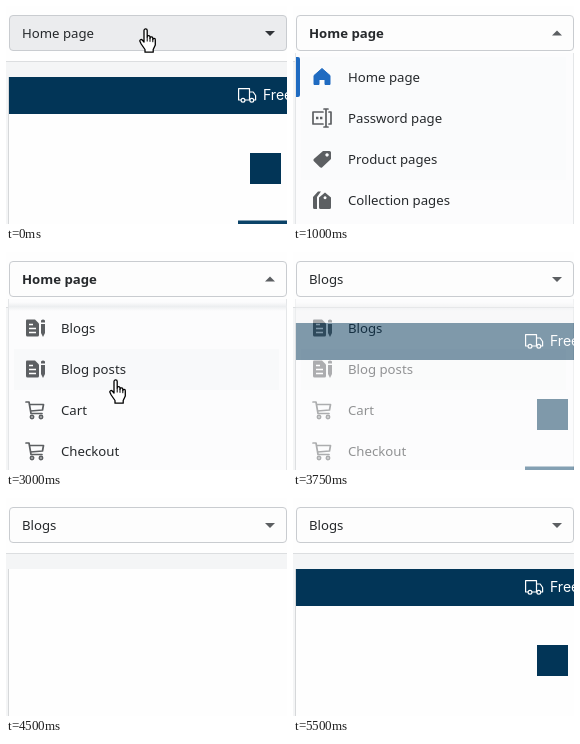
Recreate the animation shown at these times as an HTML page. Size 281 by 218 pixels, loop 5750 ms.

```html
<!DOCTYPE html>
<html lang="en">
<head>
<meta charset="utf-8">
<title>Page picker</title>
<style>
  html, body { margin: 0; width: 100%; height: 100%; overflow: hidden; background: #fefefe; }
  svg { display: block; width: 100vw; height: 100vh; }
  text { font: 13.2px "Noto Sans", "Open Sans", sans-serif; fill: #26292c; }
  #label { font-weight: 500; }
  #label.open { font-weight: 600; }
  .line { fill: none; stroke: #5c5f62; stroke-width: 1.7; stroke-linejoin: round; stroke-linecap: round; }
  .solid { fill: #5c5f62; }
</style>
</head>
<body>
<svg viewBox="0 0 281 218" preserveAspectRatio="none">
  <defs>
    <clipPath id="menuClip"><rect x="0" y="47" width="281" height="171"/></clipPath>
    <linearGradient id="fade" x2="0" y2="1">
      <stop offset="0" stop-color="#e9ebed" stop-opacity="0"/>
      <stop offset=".5" stop-color="#e9ebed" stop-opacity=".8"/>
      <stop offset="1" stop-color="#e9ebed" stop-opacity="0"/>
    </linearGradient>

    <g id="home">
      <path d="M0-8.5 8-1.5V7.5H3V2.5H-3V7.5H-8V-1.5Z" fill="#1f6bc1" stroke="#1f6bc1" stroke-linejoin="round"/>
    </g>
    <g id="password">
      <path class="line" d="M1-6H-9V6H1M7-6H9V6H7M2-9H6M4-9V9M2 9H6"/>
      <path class="solid" d="M-6-1.2h2.4v2.4h-2.4zM-2-1.2h2.4v2.4h-2.4z"/>
    </g>
    <g id="tag">
      <path class="solid" fill-rule="evenodd" d="M1-8H7.5Q9-8 9-6.5V0L0 8.5Q-1 9-2 8.2L-8.3 2Q-9 1-8.2 0ZM5-5.8a1.7 1.7 0 1 0 .1 0Z"/>
    </g>
    <g id="tags">
      <path class="solid" fill-rule="evenodd" d="M3-7.5 9-2.5V7.5Q9 9 7.5 9H-1.5Q-3 9-3 7.5V-2.5ZM3-3.8a1.5 1.5 0 1 0 .1 0Z"/>
      <path class="solid" d="M-1-8.5-5-3V9H-7.5Q-9 9-9 7.5V-3L-4-8.5Z"/>
    </g>
    <g id="blog">
      <path class="solid" d="M-8-8.5H0L4-4.5V7Q4 8.5 2.5 8.5H-7.5Q-9 8.5-9 7V-7.5Q-9-8.5-8-8.5Z"/>
      <path d="M-6-3.5H-2M-6 .5H1M-6 4.5H1" stroke="#fff" stroke-width="1.6"/>
      <path class="solid" d="M6-7.5Q8-9.5 10-7.5V-5.5H6ZM6-4H10V5L8 9 6 5Z"/>
    </g>
    <g id="cart">
      <path class="line" d="M-9-8H-6L-4 3.5H7M-5.5-5.5H8.5L7.5 0-4.5 1"/>
      <circle class="line" cx="-3" cy="7" r="1.6"/>
      <circle class="line" cx="6" cy="7" r="1.6"/>
    </g>
  </defs>

  <rect width="281" height="218" fill="#fefefe"/>
  <rect y="56" width="281" height="162" fill="#f4f5f6"/>
  <path d="M0 55.5H281" stroke="#dcdee0"/>
  <path d="M2.5 71V218" stroke="#d6d8da"/>

  <rect x="3" y="71" width="278" height="147" fill="#fefefe"/>
  <g id="page">
    <rect x="3" y="71" width="278" height="37" fill="#023557"/>
    <g fill="none" stroke="#fff" stroke-width="1.2" stroke-linejoin="round">
      <path d="M235 94H232.6V82.6H243.5V94H239M243.5 86H247.2L249.6 89.5V94H248M244 94H243"/>
      <circle cx="237" cy="94.3" r="1.9"/>
      <circle cx="245.8" cy="94.3" r="1.9"/>
    </g>
    <text x="257" y="94" style="font:14px Inter,sans-serif;fill:#fff">Free</text>
    <rect x="244" y="147" width="31" height="31" fill="#023557"/>
    <rect id="hero" x="232" y="214.5" width="49" height="4" fill="#0b4368"/>
  </g>

  <rect id="button" x="3.5" y="9.5" width="277" height="35" rx="3.5" stroke="#c9ccd0"/>
  <text id="label" x="16" y="32"></text>
  <path id="caret"/>

  <g id="menu" clip-path="url(#menuClip)">
    <rect x="2" y="47" width="279" height="171" fill="#e4e6e8"/>
    <rect x="3" y="47" width="277" height="171" fill="#fcfcfd"/>
    <g id="list"></g>
    <rect id="edge" x="3" y="50" width="278" height="9" fill="url(#fade)"/>
  </g>

  <g id="hand" stroke="#000" stroke-width="1.3" stroke-linejoin="round">
    <path fill="#fff" d="M5 2.5a1.6 1.6 0 0 1 3.2 0V9a1.4 1.4 0 0 1 2.8 .2V10.2a1.4 1.4 0 0 1 2.8 .2V11.6a1.2 1.2 0 0 1 2.5 .2V17L14.2 21.5V24.2H6V21.5L2.2 16 .8 13A1.4 1.4 0 0 1 3 11.8L5 14Z"/>
    <path fill="none" stroke-width="1" d="M8.2 9V13.5M11 10V13.8M13.8 11.5V14.2"/>
  </g>
  <path id="arrow" fill="#fff" stroke="#000" stroke-linejoin="round" d="M.6 .6V16L4.2 12.6 6.8 18.4 9.2 17.4 6.7 11.7H11.4Z"/>
</svg>

<script>
const LOOP = 5750;
const ROW = 41;
const ROWS = [
  ["Home page", "home"], ["Password page", "password"], ["Product pages", "tag"],
  ["Collection pages", "tags"], ["Collections list", "tags"], ["Blogs", "blog"],
  ["Blog posts", "blog"], ["Cart", "cart"], ["Checkout", "cart"]
];
const $ = id => document.getElementById(id);
const set = (el, attrs) => { for (const k in attrs) el.setAttribute(k, attrs[k]); };

$("list").innerHTML = ROWS.map(([name, icon], i) => {
  const y = 71 + i * ROW;
  return `<rect class="row" x="8" y="${y - 20}" width="265" height="${ROW}" fill="none"/>
    <use href="#${icon}" x="29" y="${y}"/><text x="55" y="${y + 5}">${name}</text>`;
}).join("") + '<path d="M3 51h2q2 0 2 2v36q0 2-2 2h-2z" fill="#1f6bc1"/>';
const rowRects = [...document.querySelectorAll(".row")];

// Each step changes only the listed parts of the previous state.
const STEPS = [
  [0, { label: "Home page", menu: 0, scroll: 0, hover: -1, fill: "#ebecee",
        page: true, hero: true, hand: [133, 22], arrow: null }],
  [250, { menu: .5, fill: "#f4f5f6" }],
  [500, { menu: 1, fill: "#fdfdfd" }],
  [750, { hover: 3, hand: [127, 184] }],
  [1000, { hover: -1, hand: null }],
  [2000, { hand: [127, 146] }],
  [2250, { scroll: 110, hand: [121, 146] }],
  [2500, { scroll: 200, hover: 6 }],
  [3000, { hand: [103, 127] }],
  [3250, { hand: [84, 75] }],
  [3500, { hand: null }],
  [3750, { label: "Blogs", menu: .5 }],
  [4000, { menu: 0, arrow: [130, 125] }],
  [4250, { arrow: null }],
  [4500, { page: false }],
  [4750, { page: true, hero: false }]
];

const stateAt = t => Object.assign({}, ...STEPS.filter(s => s[0] <= t).map(s => s[1]));
const show = (id, on) => set($(id), { visibility: on ? "inherit" : "hidden" });

function place(id, pos) {
  show(id, pos);
  if (pos) set($(id), { transform: `translate(${pos})` });
}

function draw(t) {
  const s = stateAt(t);
  const open = s.menu > 0 && s.label === "Home page";
  set($("button"), { fill: s.fill });
  set($("label"), { class: open ? "open" : "" });
  $("label").textContent = s.label;
  set($("caret"), {
    d: open ? "M259 29.5 264 24.5 269 29.5Z" : "M259 25 269 25 264 30Z",
    fill: t < 250 ? "#303337" : "#5c5f62"
  });
  set($("menu"), { opacity: s.menu });
  set($("list"), { transform: `translate(0 ${-s.scroll})` });
  rowRects.forEach((r, i) => set(r, {
    fill: i === s.hover ? (i === 3 ? "#f3f4f5" : "#f8f9fa") : i < 3 ? "#fafbfc" : "none"
  }));
  show("edge", s.scroll);
  show("page", s.page);
  show("hero", s.hero);
  place("hand", s.hand);
  place("arrow", s.arrow);
}

const start = performance.now();
function tick() {
  draw((performance.now() - start) % LOOP);
  requestAnimationFrame(tick);
}
tick();
</script>
</body>
</html>
```
